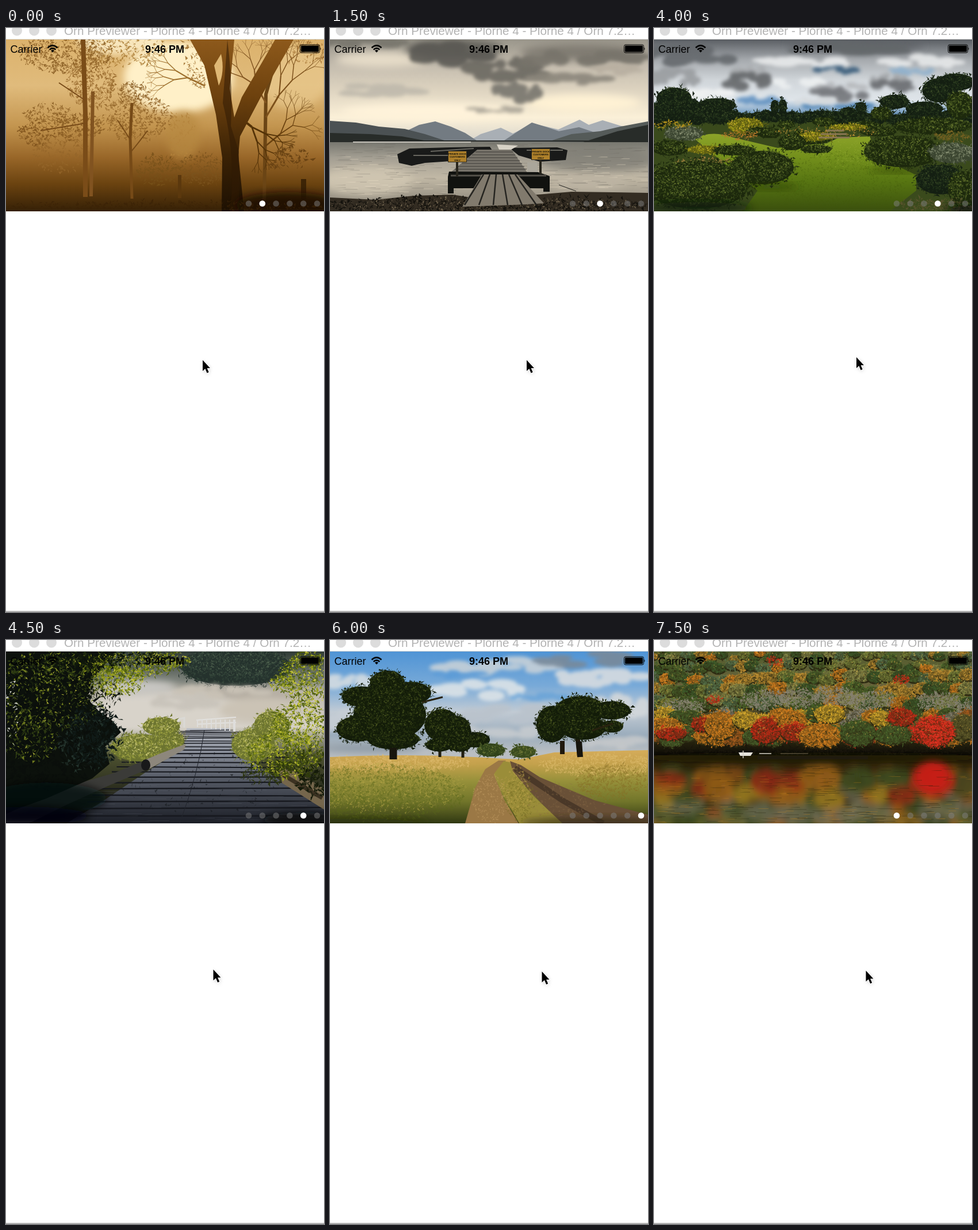
An HTML page for the animation above (8 s loop, 553 by 1013 pixels).

```html
<!DOCTYPE html>
<html lang="en">
<head>
<meta charset="utf-8">
<title>Photo carousel</title>
<style>
html, body { margin: 0; width: 100%; height: 100%; overflow: hidden; background: #fff; }
svg { display: block; width: 553px; height: 1013px; }
text { font-family: "Liberation Sans", Arial, sans-serif; }
</style>
</head>
<body>
<svg viewBox="0 0 553 1013" xmlns="http://www.w3.org/2000/svg">
  <defs>
    <clipPath id="frame"><rect y="20" width="553" height="298"/></clipPath>
    <filter id="soft" x="-50%" y="-50%" width="200%" height="200%"><feGaussianBlur stdDeviation="7"/></filter>
    <filter id="haze" x="-50%" y="-50%" width="200%" height="200%"><feGaussianBlur stdDeviation="3"/></filter>
    <filter id="ripple"><feGaussianBlur stdDeviation="4 7"/></filter>
  </defs>
  <rect width="553" height="1013" fill="#fff"/>
  <g fill="#dcdcdc"><circle cx="19" cy="4.5" r="9"/><circle cx="49" cy="4.5" r="9"/><circle cx="79" cy="4.5" r="9"/></g>
  <text x="101" y="12" font-size="20.7" fill="#b3b3b3">Orn Previewer - Plorne 4 - Plorne 4 / Orn 7.2…</text>
  <rect y="19" width="553" height="1.5" fill="#d4d4d4"/>
  <g id="slides" clip-path="url(#frame)"></g>
  <g id="dots"></g>
  <g>
    <text x="7.5" y="42.5" font-size="18">Carrier</text>
    <g fill="none" stroke="#000" stroke-width="2.6">
      <path d="M72.5 34.2Q81 26.5 89.5 34.2M75.7 37.6Q81 32.8 86.3 37.6"/>
      <path d="M78 39.3Q81 36.8 84 39.3L81 42.5Z" fill="#000" stroke="none"/>
    </g>
    <text x="276" y="42.5" font-size="18" font-weight="bold" text-anchor="middle">9:46 PM</text>
    <rect x="511.5" y="29" width="34" height="14" rx="2.5" fill="none" stroke="#000"/>
    <rect x="513" y="30.5" width="31" height="11" rx="1"/>
    <path d="M546.5 33.5q2 2.5 0 5z"/>
  </g>
  <rect y="1011" width="553" height="2" fill="#b5b5b5"/>
  <g id="cursor">
    <path d="M0 0V19L4.4 15L7.6 22.5L10.7 21L7.6 14H13Z" transform="translate(1 2)" fill="#999" filter="url(#haze)" opacity=".55"/>
    <path d="M0 0V19L4.4 15L7.6 22.5L10.7 21L7.6 14H13Z" stroke="#fff" stroke-width="2" paint-order="stroke"/>
  </g>
</svg>
<script>
const $ = id => document.getElementById(id);
let seed = 71;
const rnd = () => (seed = seed * 16807 % 2147483647) / 2147483647;
const spread = s => (rnd() * 2 - 1) * s;
const pick = list => list[Math.floor(rnd() * list.length)];
const many = (n, fn) => Array.from({ length: n }, (_, i) => fn(i)).join('');

const path = (d, fill, extra = '') => `<path d="${d}" fill="${fill}" ${extra}/>`;
const line = (d, color, w = 1) => path(d, 'none', `stroke="${color}" stroke-width="${w}"`);
const rect = (x, y, w, h, fill) => path(`M${x} ${y}h${w}v${h}h${-w}z`, fill);
const oval = (x, y, rx, ry, fill, extra = '') =>
  `<ellipse cx="${x}" cy="${y}" rx="${rx}" ry="${ry}" fill="${fill}" ${extra}/>`;
const blur = (x, y, rx, ry, fill, o = 1) => oval(x, y, rx, ry, fill, `filter="url(#soft)" opacity="${o}"`);
// A soft heap of small puffs.
const cloud = (x, y, rx, ry, fill, o = .9) => `<g filter="url(#haze)" opacity="${o}">` + many(16, () => {
  const u = spread(1);
  return oval(x + u * rx * .85, y + spread(ry * .6) * (1 - u * u * .6), rx * (.12 + rnd() * .18), ry * (.25 + rnd() * .2), fill);
}) + '</g>';

let gradients = 0;
// Vertical gradient area; stops are [page y, colour].
function shade(d, ...stops) {
  const id = 'g' + gradients++, y0 = stops[0][0], y1 = stops[stops.length - 1][0];
  return `<linearGradient id="${id}" gradientUnits="userSpaceOnUse" x1="0" x2="0" y1="${y0}" y2="${y1}">` +
    stops.map(([y, c]) => `<stop offset="${(y - y0) / (y1 - y0)}" stop-color="${c}"/>`).join('') +
    '</linearGradient>' + path(d, `url(#${id})`);
}
const box = (y0, y1) => `M0 ${y0}H553V${y1}H0Z`;

// Ragged flecks scattered inside an ellipse, as one path.
function leaves(x, y, rx, ry, n, size, fill, o = 1) {
  const d = many(Math.round(n), () => {
    const a = rnd() * 6.283, r = Math.sqrt(rnd());
    const v = many(2, () => ` ${spread(size).toFixed(1)} ${spread(size).toFixed(1)}`);
    return `M${(x + Math.cos(a) * r * rx).toFixed(1)} ${(y + Math.sin(a) * r * ry).toFixed(1)}l${v}z`;
  });
  return path(d, fill, `opacity="${o}"`);
}
// Dark body with lit leaves towards the top.
function bush(x, y, rx, ry, dark, mid, light) {
  const area = rx * ry;
  return oval(x, y, rx * .9, ry * .88, dark) +
    leaves(x, y, rx, ry, area * .22 + 12, 5, dark) +
    leaves(x, y - ry * .08, rx * .93, ry * .85, area * .26 + 10, 4, mid) +
    leaves(x, y - ry * .22, rx * .85, ry * .68, area * .12 + 6, 3, light);
}
function branch(x, y, a, len, w, color) {
  if (len < 7) return '';
  const bend = a + spread(.25), x2 = x + Math.cos(bend) * len, y2 = y + Math.sin(bend) * len;
  return line(`M${x} ${y}L${x2} ${y2}`, color, w) +
    branch(x2, y2, bend - .25 - rnd() * .3, len * .76, w * .7, color) +
    branch(x2, y2, bend + .25 + rnd() * .3, len * .76, w * .7, color);
}
// Short horizontal streaks between two heights.
const streaks = (n, y0, y1, w, color, o) => path(many(n, () =>
  `M${(rnd() * 553).toFixed(1)} ${(y0 + rnd() * (y1 - y0)).toFixed(1)}h${(rnd() * w).toFixed(1)}v1h${-w * .6}z`), color, `opacity="${o}"`);

function fog() {
  const leaf = (x, y, rx, ry, c = '#875a20', k = .26) => leaves(x, y, rx, ry, rx * ry * k, 5, c, .85);
  return shade(box(20, 318), [20, '#dcb26c'], [100, '#e0bb7c'], [170, '#c3954f'], [225, '#986628'], [270, '#6b4310'], [318, '#352006']) +
    blur(300, 85, 95, 62, '#fff0c8') + blur(200, 22, 75, 24, '#fff3d0', .8) + blur(500, 85, 60, 55, '#e8c88c', .7) +
    blur(308, 185, 30, 42, '#b88a42', .7) +
    leaf(305, 185, 28, 42, '#b3833c', .1) +
    leaf(95, 215, 48, 36, '#94652a', .15) + leaf(265, 246, 36, 27, '#765019') + leaf(340, 245, 45, 27, '#7b531d', .2) +
    leaf(205, 38, 75, 26, '#a7782f', .17) + leaf(105, 45, 82, 32) + leaf(148, 95, 42, 45, '#946528') +
    leaf(75, 150, 42, 18) + leaf(50, 185, 30, 20, '#7d501a') + leaf(125, 172, 45, 22, '#84571f') +
    leaf(228, 155, 58, 40, '#906226', .24) + leaf(220, 115, 28, 22) +
    line('M134 20L138 150V293', '#7a4c18', 8) + line('M151 110L148 292', '#815320', 6) + line('M137 125L92 95M139 165L60 178', '#774a18', 2) +
    line('M219 130L216 190L219 296', '#764a17', 5) + line('M217 215Q230 200 246 178M217 195L194 160', '#764a17', 2) +
    leaf(525, 40, 45, 22, '#aa793a', .1) + leaf(335, 45, 25, 60, '#9a6a28', .12) +
    line('M470 50L452 115L449 300', '#6b4515', 6) + branch(452, 155, -1.1, 45, 3, '#7c501b') + branch(451, 205, -.5, 34, 2.5, '#69410f') +
    branch(452, 130, -2, 35, 3, '#825521') + branch(400, 150, .9, 35, 4, '#533207') + branch(345, 100, -2.9, 32, 3, '#9d6e2c') +
    shade('M320 20L345 65L365 150L376 225L375 318H414L404 220L407 188L443 120L500 20H468L445 60L410 120L397 155L389 105L397 20Z', [20, '#8d591b'], [120, '#6d410e'], [220, '#3b2205'], [318, '#1d1002']) +
    path('M374 45Q381 75 370 100L362 65Z', '#dfb875') +
    path('M385 20Q395 100 391 170L405 215V318H390Q400 220 377 130Z', '#301b04', 'opacity=".55"') +
    leaves(490, 225, 40, 20, 110, 6, '#6b4414') + rect(513, 262, 9, 35, '#3d2406') + rect(299, 255, 6, 40, '#5b380d') +
    blur(490, 307, 90, 22, '#1d1002', .85) + leaves(276, 309, 276, 9, 400, 5, '#3a2106', .7);
}

function lake() {
  const sign = (x, y) => rect(x + 14, y + 18, 4, 26, '#29261d') + rect(x, y, 33, 20, '#302b1e') + rect(x + 1, y + 1, 31, 18, '#ae802a') +
    ['PRIVATE DOCK', 'CUSTOMERS', 'ONLY'].map((s, i) => `<text x="${x + 16.5}" y="${y + 6.5 + i * 5.5}" font-size="4.2" font-weight="bold" text-anchor="middle" fill="#17130a">${s}</text>`).join('');
  return shade(box(20, 198), [20, '#9a968b'], [65, '#c4bcae'], [110, '#dfd5c1'], [155, '#fbf0d8'], [198, '#d7d4cb']) +
    blur(90, 55, 80, 13, '#e6dcc8') + cloud(80, 108, 90, 14, '#bfb9ac') + blur(440, 130, 100, 15, '#fff2d4') + blur(170, 145, 150, 14, '#fff3da') +
    cloud(50, 25, 80, 14, '#77746c') + blur(215, 36, 85, 16, '#62605a') + cloud(225, 45, 90, 26, '#5c5a54') + cloud(310, 72, 75, 28, '#6a6861') +
    blur(440, 42, 110, 14, '#807c72') + cloud(440, 55, 110, 24, '#77736a') + cloud(325, 110, 45, 24, '#77746d') + cloud(420, 88, 75, 14, '#8a857a') +
    cloud(290, 142, 50, 8, '#aaa497') + cloud(505, 72, 55, 12, '#b8afa0') +
    path('M240 197L262 184L297 173L318 183L335 175L350 165L376 171L397 176L434 159L450 168L474 160L510 171V198Z', '#a9afb5') +
    path('M130 180L155 168L183 162L210 171L235 182L258 197H130ZM300 197L330 177L351 164L377 172L398 179L433 172L460 181L440 197Z', '#737b82') +
    path('M0 161L45 164L85 171L130 175L165 184L205 197H0Z', '#4b5153') + path('M380 197L420 184L470 179L505 171L553 162V199Z', '#555b59') +
    path('M0 182L70 184L125 188L180 198H0ZM440 198L500 179L553 168V201Z', '#282c29') +
    shade(box(198, 300), [198, '#77776f'], [225, '#a49f93'], [260, '#c1b8a5'], [300, '#938d80']) +
    blur(465, 228, 100, 22, '#77766e', .65) + blur(65, 265, 80, 25, '#d2c8b3', .8) + blur(450, 268, 65, 14, '#bcb3a2') +
    streaks(210, 200, 292, 34, '#5e5c55', .28) + streaks(90, 220, 290, 28, '#efe3ca', .4) +
    rect(0, 195, 553, 2.5, '#282b29') + rect(40, 197, 205, 1.5, '#e2ded5') +
    path('M117 219L138 209L210 207L278 206L282 212L225 230L165 234L142 239L120 234ZM312 208L395 207L413 212L410 229L365 232L328 221Z', '#191a19') +
    line('M145 221H208M175 214L250 209M342 212H405', '#67665f', 2) + path('M290 202L327 204L315 211H294Z', '#d7d2c6') +
    path('M256 211H316L344 252H208Z', '#77736a') + many(7, i => line(`M${253 - i * 6} ${215 + i * 5}H${318 + i * 4}`, '#3c3b37')) +
    rect(343, 233, 18, 17, '#aaa69b') + path('M207 249L362 250L382 257V284H371V278H215V287H205V258Z', '#11120f') +
    line('M210 256H376', '#54514a', 3) + line('M398 272L428 283', '#22211d') +
    sign(205, 213) + sign(350, 209) +
    path('M0 294L80 298L145 291L213 289L270 298L325 292L420 284L553 286V318H0Z', '#332c22') +
    leaves(276, 306, 280, 14, 720, 6, '#14120d') + leaves(276, 306, 276, 12, 440, 3, '#786b53') +
    path('M264 254H326L372 304L340 306L230 310Z', '#817a6d') + many(6, i => line(`M${267 + i * 11} 254L${234 + i * 25} 307`, '#252420', 2.5));
}

function garden() {
  const wild = (x, y, rx, ry) => bush(x, y, rx, ry, '#1d290d', '#3d4e1c', '#6b7b30');
  const pine = (x, y, rx, ry) => bush(x, y, rx, ry, '#141f12', '#22321a', '#3a4a26');
  const gold = (x, y, rx, ry) => bush(x, y, rx, ry, '#606012', '#a09a18', '#d2b530');
  const grey = (x, y, rx, ry) => bush(x, y, rx, ry, '#3c4631', '#6b755b', '#939b7c');
  return shade(box(20, 170), [20, '#5a5e63'], [55, '#a5a9ad'], [90, '#d0d5d9'], [125, '#dfe5ea'], [150, '#6b97c0']) +
    cloud(70, 48, 95, 26, '#65696d') + blur(350, 30, 120, 8, '#5b5f63') + cloud(350, 36, 130, 14, '#63676b') + cloud(260, 60, 90, 14, '#e8eaeb') + cloud(475, 58, 80, 14, '#e6e8e9') +
    cloud(35, 86, 48, 22, '#9a9da0') + cloud(250, 95, 50, 14, '#edf0f1') + cloud(90, 115, 80, 12, '#f1f2f2') +
    cloud(315, 73, 43, 9, '#355a79') + cloud(185, 126, 45, 10, '#6292c1') + cloud(315, 135, 75, 8, '#4d83b5') + cloud(450, 75, 42, 10, '#8eb0cd') +
    cloud(170, 78, 44, 18, '#a9acaf') + cloud(168, 92, 48, 22, '#65686b') + cloud(325, 104, 50, 14, '#b5b8bb') + cloud(322, 115, 52, 17, '#73767a') +
    cloud(413, 90, 38, 14, '#a2a5a8') + cloud(413, 100, 40, 14, '#696c70') + cloud(282, 126, 38, 10, '#d5d9dc') +
    rect(0, 156, 553, 162, '#3a4a1c') + many(38, i => pine(i * 15, 155 + spread(5), 13, 11)) +
    pine(35, 122, 34, 21) + pine(12, 150, 26, 24) + pine(60, 142, 28, 22) + pine(110, 134, 36, 14) + pine(105, 152, 44, 14) +
    pine(210, 137, 8, 14) + pine(224, 136, 8, 14) + pine(360, 138, 11, 11) + pine(338, 147, 17, 11) +
    pine(525, 94, 36, 17) + pine(497, 108, 34, 24) + pine(418, 128, 28, 14) + pine(470, 140, 36, 14) + wild(395, 148, 20, 13) + wild(532, 134, 26, 27) +
    shade('M70 192Q100 176 138 190L215 208L300 200L322 190L375 188L390 224L456 255V282L410 318H155L180 282Z', [180, '#8fa52a'], [220, '#76921d'], [265, '#587612'], [318, '#3a4f0d']) +
    leaves(320, 265, 120, 50, 1500, 3, '#43590c', .4) + leaves(340, 219, 60, 24, 380, 2, '#9bb03b', .6) +
    wild(200, 182, 26, 10) + wild(295, 163, 22, 9) + wild(365, 170, 36, 9) + gold(160, 170, 34, 16) + wild(183, 180, 26, 9) +
    wild(270, 190, 46, 13) + gold(280, 188, 34, 9) + wild(282, 210, 30, 8) + wild(240, 198, 26, 16) + wild(230, 168, 16, 8) + gold(340, 172, 40, 6) + wild(390, 180, 35, 9) +
    leaves(150, 186, 32, 7, 110, 4, '#b3762a') + leaves(300, 180, 90, 9, 110, 4, '#b58a34') + line('M290 184H335M286 190H340M300 178H330', '#897753', 3) +
    grey(52, 183, 37, 14) + leaves(35, 168, 35, 5, 90, 4, '#b6931c') + wild(28, 208, 36, 15) + gold(90, 211, 36, 8) + wild(140, 212, 40, 10) +
    leaves(88, 232, 50, 7, 110, 5, '#9a7b3b') + wild(188, 242, 61, 33) + wild(74, 272, 102, 47) + blur(75, 312, 95, 10, '#111a0b', .7) +
    blur(205, 275, 45, 5, '#28380b', .7) + blur(420, 247, 45, 4, '#28380b', .7) +
    wild(485, 170, 75, 16) + leaves(520, 188, 35, 7, 120, 5, '#776222') + wild(433, 214, 75, 31) + grey(518, 217, 43, 20) +
    pine(498, 263, 46, 29) + wild(540, 280, 32, 36) + leaves(490, 307, 65, 10, 260, 5, '#57532c') + blur(545, 315, 40, 7, '#101709');
}

function boardwalk() {
  const lime = (x, y, rx, ry) => leaves(x, y, rx, ry, rx * ry * .16, 6, '#4f600c') + leaves(x, y, rx, ry, rx * ry * .13, 5, '#98a01c') + leaves(x, y, rx, ry, rx * ry * .07, 4, '#cdcb3c');
  const dim = (x, y, rx, ry) => leaves(x, y, rx, ry, rx * ry * .07, 6, '#2c3a12') + leaves(x, y, rx, ry, rx * ry * .035, 5, '#6e7a1e') + leaves(x, y, rx, ry, rx * ry * .012, 4, '#a9ab35');
  const reeds = (x, y, rx, ry) => bush(x, y, rx, ry, '#6c7430', '#9a9f40', '#cfcb7c');
  return shade(box(20, 318), [20, '#2f3a35'], [70, '#7d827b'], [90, '#bdb7ac'], [150, '#d7d2c9'], [200, '#4d5130'], [318, '#08090b']) +
    bush(400, 46, 105, 38, '#25322d', '#34463a', '#50634f') +
    blur(400, 97, 105, 12, '#b0a99e', .9) + blur(275, 123, 135, 34, '#d8d3ca') + blur(440, 121, 70, 22, '#cbc3b5') + blur(230, 82, 65, 12, '#c9c8c4') +
    cloud(375, 90, 80, 16, '#c9c2b6') + cloud(310, 105, 70, 18, '#c8c3ba') +
    shade('M314 153H388L402 185L440 220L553 293V318H105L160 285L242 230L310 187Z', [153, '#bcc0c8'], [190, '#8b909b'], [240, '#565b66'], [318, '#1b1e26']) +
    many(24, i => { const y = 157 + i * i * .28; return line(`M${Math.max(110, 320 - i * 8.5)} ${y}L${Math.min(553, 390 + i * 7.5)} ${y + spread(2)}`, '#17191f', .7 + i * .09); }) +
    line('M345 156Q335 230 302 318', '#22252d', 1) + leaves(330, 250, 140, 55, 160, 4, '#16191d', .6) + streaks(50, 250, 316, 60, '#6b7079', .2) +
    line('M331 139L400 134M332 146L400 143', '#e2e1de', 2) + many(9, i => line(`M${333 + i * 8} 138V${151 + i}`, '#dedddb', i === 8 ? 4 : 2)) + line('M290 140L310 135V152M300 137V150', '#dad9d5', 3) +
    reeds(235, 187, 60, 27) + reeds(285, 175, 28, 18) + reeds(270, 150, 36, 18) + reeds(430, 182, 42, 32) + reeds(462, 148, 34, 28) +
    path('M0 302L105 255L190 230L235 211L242 226L180 252L105 286L40 318H0Z', '#3b3b38') + path('M237 210L268 197L313 180L310 190L270 212L245 226Z', '#8d877c') + oval(243, 217, 8, 10, '#19191a') +
    leaves(470, 232, 60, 16, 260, 6, '#2c3510') +
    path('M476 227Q495 221 515 235L553 258V294L515 270L480 248Z', '#75664c') + line('M480 233L550 274', '#3c3222', 7) +
    lime(485, 198, 65, 40) + lime(515, 145, 52, 38) + lime(525, 65, 52, 46) + lime(480, 72, 24, 14) + leaves(520, 215, 45, 28, 170, 7, '#303b0b') + leaves(540, 245, 30, 26, 130, 8, '#151b0a') +
    path('M0 20H190L150 70L140 100L160 122L185 140L200 160L172 185L180 215L150 240L70 275L0 300Z', '#0c110c') +
    leaves(65, 155, 115, 100, 900, 9, '#0a0e0b') + leaves(155, 165, 50, 50, 320, 9, '#101a17') + leaves(140, 175, 55, 55, 130, 6, '#23332c') +
    blur(70, 275, 105, 28, '#060809', .75) +
    dim(70, 90, 105, 68) + dim(110, 50, 110, 30) + dim(40, 170, 50, 40) + leaves(140, 95, 60, 30, 150, 7, '#0d130b') +
    lime(215, 43, 85, 20) + lime(195, 72, 48, 24) + lime(275, 35, 45, 16) + leaves(180, 32, 110, 14, 240, 8, '#10180b') +
    leaves(12, 130, 14, 60, 35, 5, '#c8c9c1') + blur(35, 305, 110, 16, '#050608', .9) + blur(520, 312, 75, 13, '#070a0a', .9);
}

function field() {
  const oak = (x, y, rx, ry) => bush(x, y, rx, ry, '#131c09', '#24300f', '#47531e');
  return shade(box(20, 210), [20, '#4f94d5'], [80, '#79aad8'], [125, '#c2cbd4'], [165, '#9aacbc'], [195, '#b9bec2']) +
    cloud(290, 45, 105, 20, '#c6d0d8') + cloud(450, 34, 100, 18, '#78899a') + cloud(30, 72, 55, 18, '#d4dce1') + cloud(260, 85, 90, 24, '#dce3e7') + cloud(460, 65, 95, 22, '#d7dce0') +
    cloud(225, 60, 45, 10, '#5b9bd7') + cloud(365, 98, 55, 10, '#6ba4d8') + cloud(310, 130, 100, 22, '#bac3cc') + cloud(510, 115, 50, 28, '#d2d7da') + cloud(35, 145, 60, 25, '#c6ced5') +
    cloud(300, 160, 120, 16, '#c6cbcf') + blur(70, 188, 90, 7, '#8996a2') + cloud(495, 178, 65, 14, '#c5c8ca') +
    shade('M0 203Q150 196 302 206L330 207L390 195L553 191V318H0Z', [191, '#d5ac5a'], [215, '#c4a14c'], [245, '#96903a'], [280, '#71752a'], [318, '#303812']) +
    path('M293 209H306L285 233L303 277L328 318H235L253 255L270 224Z', '#9b7845') + path('M313 210L332 217L365 238L460 278L553 303V318H402L345 260L317 226Z', '#695037') +
    path('M302 210L313 212L319 231L350 267L404 318H329L302 270L286 231Z', '#9a8d39') +
    line('M321 222L404 278L475 318', '#4a3828', 10) + leaves(280, 275, 32, 42, 420, 3, '#c39d65', .6) + leaves(410, 278, 70, 30, 260, 4, '#8a6c48', .4) +
    leaves(115, 214, 130, 12, 700, 5, '#e0bd70', .7) + leaves(90, 265, 145, 48, 1800, 5, '#59671a', .55) + leaves(95, 255, 140, 45, 1100, 4, '#b6a647', .55) +
    leaves(470, 216, 105, 19, 620, 5, '#ddbb6b', .7) + leaves(490, 246, 62, 30, 520, 5, '#866c23', .55) + leaves(330, 274, 28, 40, 300, 4, '#736b22', .6) + leaves(325, 260, 25, 40, 200, 4, '#c0a44c', .6) +
    blur(50, 317, 120, 7, '#293111', .8) + blur(460, 317, 130, 9, '#2d2516', .75) +
    line('M191 175V203M231 177V204', '#211e11', 5) + line('M404 175V198M430 165L434 202', '#21190d', 8) +
    oak(100, 76, 34, 26) + oak(55, 98, 38, 20) + oak(140, 92, 40, 22) + oak(104, 130, 70, 50) + oak(49, 154, 42, 25) + oak(110, 172, 50, 20) +
    oak(195, 148, 34, 32) + oak(222, 160, 26, 32) + oak(190, 182, 26, 13) + oak(253, 173, 28, 15) + oak(226, 185, 20, 10) +
    oak(386, 146, 30, 36) + oak(435, 122, 48, 28) + oak(490, 122, 36, 18) + oak(440, 152, 44, 24) + oak(490, 150, 22, 12) +
    bush(280, 191, 27, 13, '#30421a', '#435526', '#687435') + bush(336, 194, 24, 12, '#394a1d', '#53622b', '#737b38') +
    line('M110 187V207', '#17150d', 13) + line('M433 176L435 203', '#17150d', 10) + line('M160 108L196 99M456 157L492 145', '#28220f', 3);
}

function autumn() {
  const red = '#c22a16', orange = '#d07c1e', yellow = '#d3a62a', green = '#47602a', rust = '#a85a1c', grey = '#85806f';
  const crown = (x, y, rx, ry, c) => oval(x, y + 2, rx * .92, ry * .92, '#2d2a12') + oval(x, y, rx * .9, ry * .85, c, 'opacity=".55"') +
    leaves(x, y + ry * .3, rx, ry * .7, rx * ry * .12, 5, '#2d2a12', .7) + leaves(x, y, rx, ry, rx * ry * .4, 4, c) +
    leaves(x, y - ry * .25, rx * .8, ry * .6, rx * ry * .05, 3, '#f0c050', .5);
  const rows = [[28, 34, 12, 8], [46, 31, 15, 10], [66, 28, 18, 12], [88, 26, 21, 13], [108, 24, 24, 14]];
  const slope = ['#3c5a2a', '#4e682d', '#77803a', green, '#8a8a4a', '#b98a30', orange, '#55704a'];
  const far = rows.map(([y, n, rx, ry]) => many(n, i => crown(i * 553 / (n - 1) + spread(8), y + spread(6), rx, ry, pick(slope)))).join('') +
    [[50, 117], [190, 104], [250, 100], [315, 98], [380, 104], [495, 108], [545, 122]].map(([x, y]) => leaves(x, y, 38, 15, 380, 5, grey)).join('') +
    [[210, 37], [103, 103], [430, 68]].map(([x, y]) => leaves(x, y, 14, 7, 80, 4, red)).join('');
  const near = many(24, i => crown(i * 24 + spread(8), 136 + spread(8), 22, 16, pick([orange, yellow, rust, green, grey, orange]))) +
    many(20, i => crown(i * 29 + spread(7), 166 + spread(6), 24, 16, pick([rust, green, orange, red, '#5f5a2a']))) +
    crown(20, 150, 34, 18, orange) + crown(30, 162, 30, 12, red) + crown(65, 133, 20, 14, green) + crown(85, 146, 22, 14, red) +
    crown(115, 148, 30, 28, orange) + crown(158, 138, 24, 18, yellow) + crown(195, 157, 28, 25, red) +
    crown(240, 140, 28, 20, orange) + crown(245, 160, 28, 18, red) + crown(305, 128, 30, 18, yellow) + crown(290, 166, 42, 24, orange) + crown(355, 160, 34, 25, green) +
    crown(395, 136, 22, 16, yellow) + crown(430, 134, 26, 18, red) + crown(415, 164, 36, 18, green) + crown(537, 151, 25, 26, '#5f5a2a') + crown(487, 159, 38, 29, red) + leaves(487, 157, 35, 26, 400, 5, '#dc3020');
  return shade(box(20, 202), [20, '#545d2e'], [90, '#6c633d'], [150, '#3a3515'], [202, '#100e07']) +
    `<g id="bank">${far}${near}</g>` +
    blur(276, 198, 300, 4, '#100e08') + leaves(276, 192, 285, 6, 700, 6, '#19150b') +
    rect(0, 200, 553, 118, '#2a2109') +
    '<g clip-path="url(#water)"><use href="#bank" transform="translate(0 404) scale(1 -1)" filter="url(#ripple)" opacity=".85"/></g>' +
    '<clipPath id="water"><rect y="204" width="553" height="114"/></clipPath>' +
    blur(484, 237, 32, 28, '#cc1f12', .85) + blur(276, 204, 310, 5, '#14120a', .9) +
    streaks(240, 207, 316, 32, '#211d09', .35) + streaks(120, 235, 316, 24, '#d18a20', .3) +
    path('M147 195H172L168 201H150Z', '#e6e4dd') + line('M155 192V205M183 197H204', '#d5d1c8', 1.5) + line('M220 197H268', '#736651', 1);
}

const slides = [fog, lake, garden, boardwalk, field, autumn];
$('slides').innerHTML = slides.map(draw => `<g>${draw()}</g>`).join('');
$('dots').innerHTML = many(6, i => `<circle cx="${422 + i * 23.8}" cy="304.5" r="5.3"/>`);

const LOOP = 8000, HOLD = 1500;
const moves = [[0, 342, 576], [4000, 352, 571], [4500, 360.5, 571.5], [5000, 368.5, 575], [6500, 368.5, 573.5]];
const start = performance.now();

function render(t) {
  const current = Math.floor(t / HOLD);
  [...$('slides').children].forEach((g, i) => g.setAttribute('display', i === current ? 'inline' : 'none'));
  [...$('dots').children].forEach((dot, i) =>
    dot.setAttribute('fill', i === (current + 1) % 6 ? '#fff' : 'rgba(128,128,128,.5)'));
  const [, x, y] = moves.filter(m => m[0] <= t).pop();
  $('cursor').setAttribute('transform', `translate(${x} ${y})`);
}
function tick() {
  render((performance.now() - start) % LOOP);
  requestAnimationFrame(tick);
}
tick();
</script>
</body>
</html>
```
